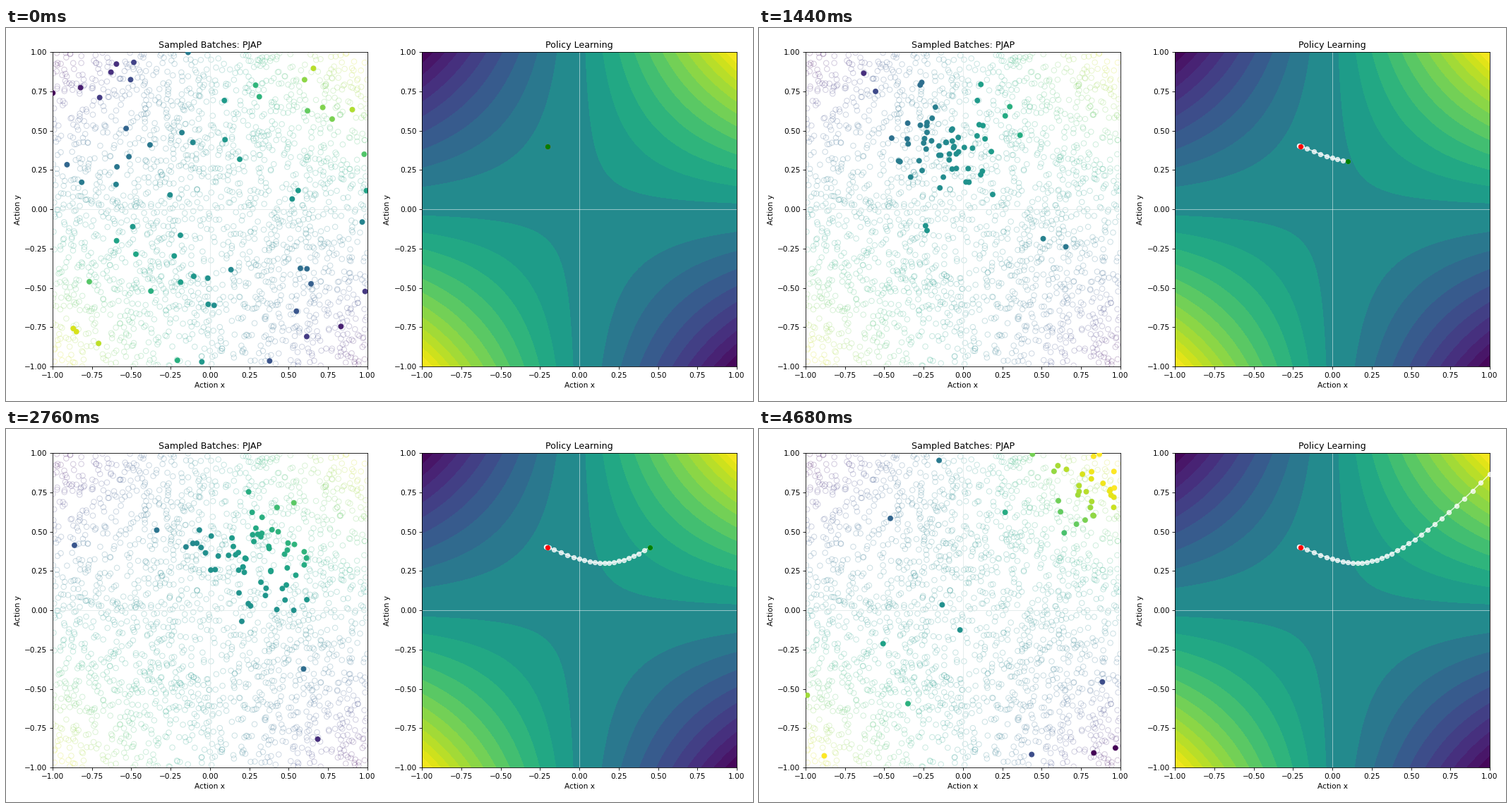
Write a matplotlib script that moves like this. It is 1058x529 px and loops after 4.8 s.

```python
import matplotlib.pyplot as plt
import numpy as np
from matplotlib.animation import FuncAnimation

W, H = 1058, 529
FIG_SIZE = (14, 7)
DPI = 75.5715
FRAMES, INTERVAL = 40, 120
SIDE = 446
SPREAD = 0.2
BATCH = 60
START = np.array([-0.2, 0.4])
STALL = 5

# Key points of the learned path: step, x, y.
KEYS = np.array([
    (5, -.16, .386), (12, .098, .305), (20, .345, .345),
    (27, .605, .513), (32, .839, .71), (35, .998, .867)])
path_fit = np.polyfit(KEYS[:, 0], KEYS[:, 1:], 4)


def policy_action(step):
    """Hang back around the start, then follow the smooth path."""
    if step >= STALL:
        return step ** np.arange(4, -1, -1) @ path_fit
    u = step / STALL
    ease = u * u * (4 * u - 3)
    return START + ease * (KEYS[0, 1:] - START)


def sample_batch(step):
    """Stray uniform picks plus picks around the delayed policy action."""
    rng = np.random.default_rng(100 + step)
    settling = 0.4 ** step
    late = max(0, step - 25)
    stray = round(4 + (BATCH - 4) * settling + 0.7 * late)
    near = round(BATCH * (1 - settling) - 2.2 * late)
    center = path[max(0, step - 5)] + (0, 0.002 * step)
    weights = np.exp(-((actions - center) ** 2).sum(axis=1) / (2 * SPREAD ** 2))
    picks = np.concatenate([
        rng.choice(len(actions), stray, replace=False),
        rng.choice(len(actions), near, replace=False, p=weights / weights.sum()),
    ])
    return actions[picks]


def reward_colors(points, limit):
    return viridis(plt.Normalize(-limit, limit)(points[:, 0] * points[:, 1]))


def make_axes(left, title):
    ax = fig.add_axes([left / W, 48.8 / H, SIDE / W, SIDE / H])
    ticks = np.linspace(-1, 1, 9)
    ax.set(xlim=(-1, 1), ylim=(-1, 1), xticks=ticks, yticks=ticks,
           title=title, xlabel="Action x", ylabel="Action y")
    return ax


def cross_lines(ax, **style):
    ax.axhline(0, **style)
    ax.axvline(0, **style)


def draw_reward(ax):
    """Filled reward bands that get narrower towards the corners."""
    k = np.arange(12)
    rising = 0.04 + 0.112 * k - 0.0028 * k ** 2
    falling = -0.14 - 0.125 * k[:9] + 0.0034 * k[:9] ** 2
    levels = np.concatenate([[-1], falling[::-1], rising, [1]])
    mids = (levels[:-1] + levels[1:]) / 2
    gx, gy = np.meshgrid(*[np.linspace(-1, 1, 241)] * 2)
    ax.contourf(gx, gy, gx * gy, levels=levels,
                colors=list(viridis((mids + 1) / 2)))


plt.rcParams["font.family"] = "DejaVu Sans"
viridis = plt.get_cmap("viridis")
fig = plt.figure(figsize=FIG_SIZE, dpi=DPI, facecolor="white")
batch_ax = make_axes(65.8, "Sampled Batches: PJAP")
policy_ax = make_axes(589, "Policy Learning")

path = np.array([policy_action(step) for step in range(FRAMES)])
actions = np.random.default_rng(7).uniform(-1, 1, (2000, 2))

batch_ax.scatter(*actions.T, s=50, facecolors="none", linewidths=1,
                 edgecolors=reward_colors(actions, 1), alpha=0.23)
cross_lines(batch_ax, color="#dfe9e9", lw=0.8, zorder=1.5)
batch_dots = batch_ax.scatter([], [], s=40, zorder=3)

draw_reward(policy_ax)
cross_lines(policy_ax, color="white", lw=1, alpha=0.5)
trail, = policy_ax.plot([], [], "o-", color="white", alpha=0.75, zorder=4)
policy_ax.plot(*START, "o", color="red", zorder=5)
current, = policy_ax.plot([], [], "o", color="green", zorder=6)


def update(step):
    batch = sample_batch(step)
    batch_dots.set_offsets(batch)
    batch_dots.set_color(reward_colors(batch, 0.75))
    trail.set_data(*path[:step + 1].T)
    current.set_data(*path[step:step + 1].T)
    return batch_dots, trail, current


anim = FuncAnimation(fig, update, frames=FRAMES, interval=INTERVAL,
                     init_func=lambda: update(0), repeat=True, repeat_delay=0)
plt.show()
```
